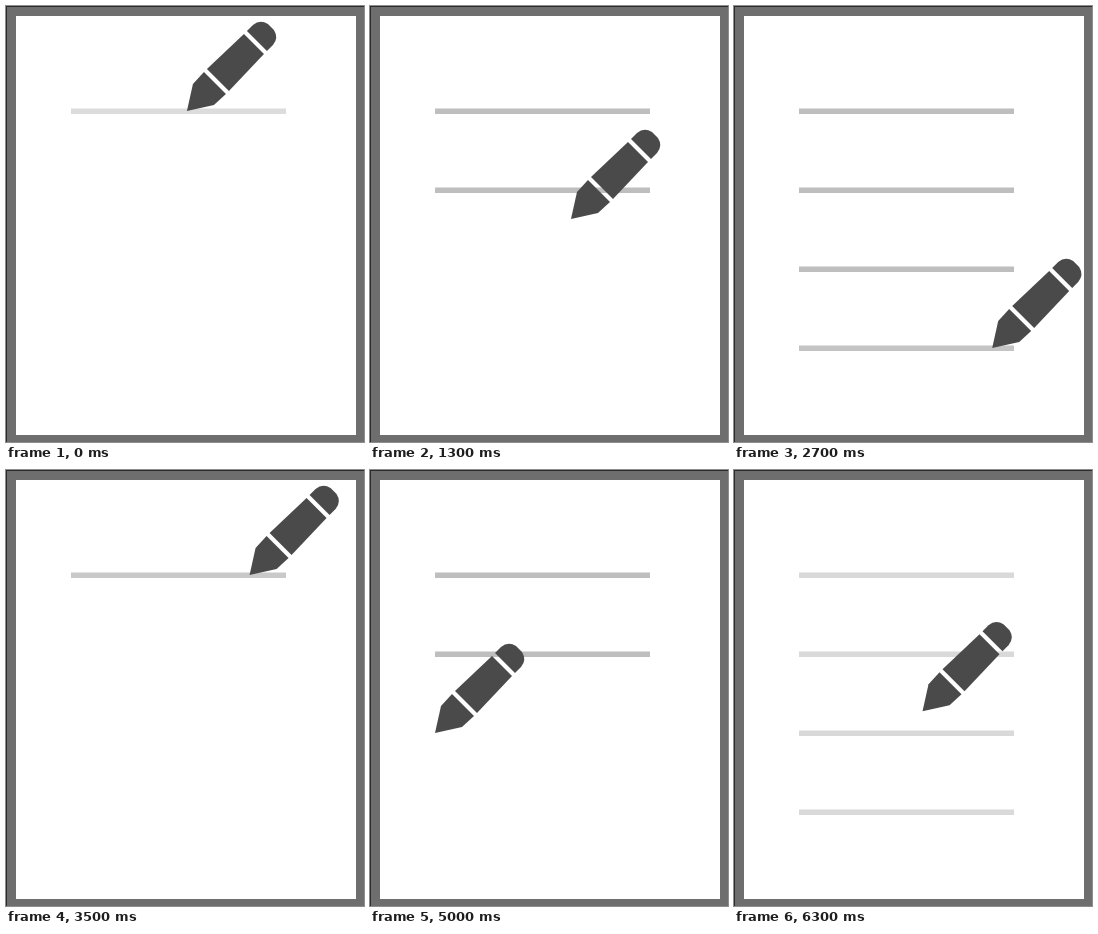
Write an HTML page that moves like this. It is 358 px wide and 436 px high and loops after 6400 ms.

```html
<!DOCTYPE html>
<html lang="en">
<head>
<meta charset="utf-8">
<title>Writing pencil</title>
<style>
  html, body { margin: 0; width: 100%; height: 100%; overflow: hidden; background: #6e6e6e; }
  svg { display: block; width: 358px; height: 436px; }
</style>
</head>
<body>
<svg viewBox="0 0 358 436">
  <rect width="358" height="436" fill="#6e6e6e"/>
  <path d="M0 0H358V1H1V436H0Z" fill="#2c2c2c"/>
  <rect x="10" y="10" width="340" height="419" fill="#fff"/>
  <g id="lines" fill="#bebebe">
    <rect x="65" y="102.5" width="215" height="5.5"/>
    <rect x="65" y="181.5" width="215" height="5.5"/>
    <rect x="65" y="260.5" width="215" height="5.5"/>
    <rect x="65" y="339.5" width="215" height="5.5"/>
  </g>
  <g id="pen" fill="#4a4a4a">
    <path d="M0 0L6-27L17-39L39-17L27-6Z"/>
    <path d="M20-42L57-77L77-57L42-20Z"/>
    <path d="M60-80L66-86Q73-92 81-87L87-81Q92-73 86-66L80-60Z"/>
  </g>
</svg>
<script>
const LOOP = 6400, STEP = 100;
const LEFT = 65, RIGHT = 280, TOP = 105, GAP = 79;

// [time, stroke]: even strokes write a line, odd strokes move to the next one
const beats = [
  [-210, 0], [190, 1], [240, 1], [734, 2], [1130, 3], [1540, 4],
  [1890, 5], [2090, 5], [2400, 6], [2778, 7], [3200, 8], [3611, 9],
  [4160, 10], [4540, 11], [4900, 12], [5000, 12], [5300, 13],
  [5600, 14], [6110, 15], [6530, 16]
];

const pen = document.getElementById('pen');
const lines = [...document.getElementById('lines').children];
const mix = (a, b, p) => a + (b - a) * p;
const ease = p => 0.5 - Math.cos(Math.PI * p) / 2;

function strokeAt(t) {
  const i = beats.findIndex(b => b[0] > t);
  const [t0, s0] = beats[i - 1], [t1, s1] = beats[i];
  return mix(s0, s1, ease((t - t0) / (t1 - t0)));
}

function draw(t) {
  const s = strokeAt(t) % 8;
  const row = Math.floor(s / 2);
  const p = s % 1;
  const writing = Math.floor(s) % 2 === 0;
  const clearing = s >= 7;

  const x = writing ? mix(LEFT, RIGHT, p) : mix(RIGHT, LEFT, p);
  const nextRow = writing ? row : (row + 1) % 4;
  const y = TOP + GAP * mix(row, nextRow, p);
  pen.setAttribute('transform', `translate(${x} ${y})`);

  lines.forEach((line, i) => {
    let alpha = i <= row ? 1 : 0;
    if (clearing) alpha = 1 - p;
    else if (writing && i === row) alpha = p;
    line.setAttribute('opacity', alpha);
  });
}

const start = performance.now();
function tick() {
  const t = (performance.now() - start) % LOOP;
  draw(Math.floor(t / STEP) * STEP);
  requestAnimationFrame(tick);
}
tick();
</script>
</body>
</html>
```
